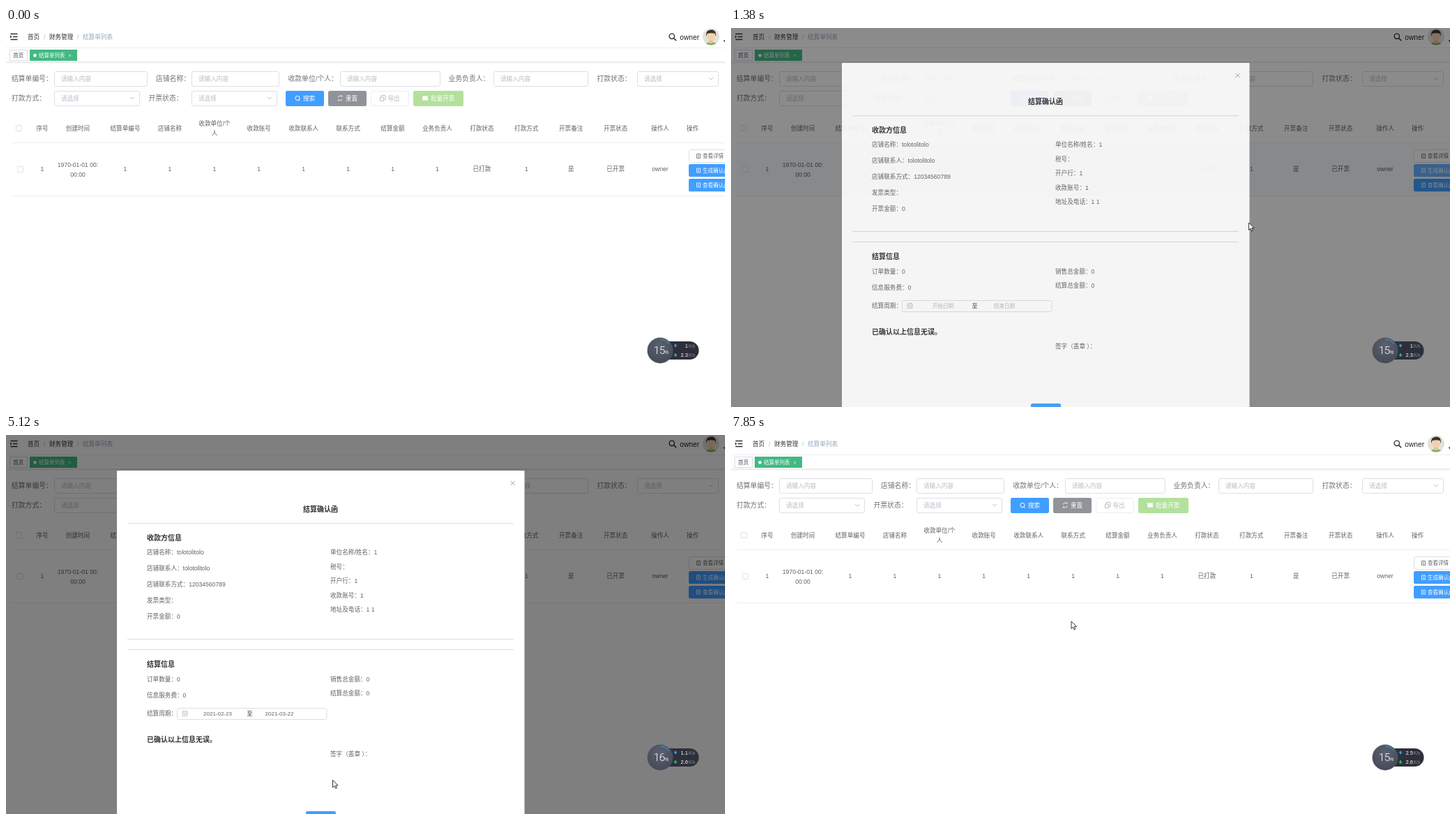
These frames come from a looping animation (1031x543 px, 8000 ms). An HTML page:

```html
<!DOCTYPE html>
<html lang="zh">
<head>
<meta charset="utf-8">
<title>结算单列表</title>
<style>
html, body { margin: 0; width: 100%; height: 100%; overflow: hidden; background: #fff; }
svg { display: block; width: 1031px; height: 543px; }
text { font-family: "Liberation Sans", "Noto Sans CJK SC", "Noto Sans CJK", sans-serif; white-space: pre; }
.thin { font-family: Roboto, "Open Sans", sans-serif; font-weight: 300; letter-spacing: -.4px; }
</style>
</head>
<body>
<svg id="stage" viewBox="0 0 1031 543"></svg>
<script>
const LOOP = 8000;
const BLUE = '#409eff', LIGHT = '#66b1ff', INK = '#606266', DARK = '#303133';
const PALE = '#b8bbc3', EDGE = '#dcdfe6';

// ---- drawing helpers (text is placed by its vertical centre) ----
const text = (x, y, s, size = 8.6, fill = INK, more = '') =>
  `<text x="${x}" y="${(y + size * 0.37).toFixed(2)}" font-size="${size}" fill="${fill}" ${more}>${s}</text>`;
const mid = (x, y, s, size, fill, more = '') => text(x, y, s, size, fill, 'text-anchor="middle" ' + more);
const bold = (x, y, s, more = '') => text(x, y, s, 10, DARK, 'font-weight="600" ' + more);
const rect = (x, y, w, h, fill, more = '') =>
  `<rect x="${x}" y="${y}" width="${w}" height="${h}" fill="${fill}" ${more}/>`;
const solid = (x, y, w, h, fill, more = '') => rect(x, y, w, h, fill, `rx="2.3" ${more}`);
const box = (x, y, w, h, fill, stroke, more = '', r = 2.3) =>
  rect(x + .5, y + .5, w - 1, h - 1, fill, `rx="${r}" stroke="${stroke}" ${more}`);
const path = (d, stroke, width = 1, more = '') =>
  `<path d="${d}" fill="none" stroke="${stroke}" stroke-width="${width}" ${more}/>`;
const circle = (x, y, r, fill, more = '') => `<circle cx="${x}" cy="${y}" r="${r}" fill="${fill}" ${more}/>`;
const line = (x1, y, x2, stroke) => path(`M${x1} ${y}H${x2}`, stroke);
const docIcon = (x, y, c) => path(`M${x - 2.5} ${y - 3}h5v6h-5zM${x - 1} ${y - 1}h2M${x - 1} ${y + 1}h2`, c, .8);

function input(x, y, w, hint) {
  return box(x, y, w, 22, '#fff', EDGE) + text(x + 10, y + 10.5, hint, 8.6, PALE);
}
function select(x, y, w) {
  return input(x, y, w, '请选择') + path(`M${x + w - 14} ${y + 9}l3 3 3-3`, PALE, .9);
}

function header() {
  return path('M6.5 8.5h10M10 12.5h6.5M6.5 16.5h10', DARK, 1.3) + `<path d="M6 10.5v4l2.6-2z" fill="${DARK}"/>`
    + text(31, 13, '首页', 8.6, DARK) + text(54, 13, '/', 8.6, PALE)
    + text(62, 13, '财务管理', 8.6, DARK) + text(102, 13, '/', 8.6, PALE)
    + text(110, 13, '结算单列表', 8.6, '#97a8be')
    + circle(954.8, 11.8, 3.7, 'none', `stroke="${DARK}" stroke-width="1.4"`) + path('M957.5 14.5l3.6 3.6', DARK, 1.6)
    + text(966.3, 13, 'owner', 10.2, '#222')
    + '<clipPath id="face"><circle cx="1011" cy="12.5" r="12"/></clipPath><g clip-path="url(#face)">'
    + rect(998, 0, 26, 26, '#e3e1da')
    + '<ellipse cx="1011" cy="26" rx="9" ry="6" fill="#84b254"/>'
    + rect(1008.5, 15, 5, 7, '#e8bf9a') + circle(1011, 12, 6, '#f3d1b0')
    + '<path d="M1004 12q-1-9 7-9.5q8 0 7 9.5l-1.5-4q-5-1.5-11 0z" fill="#40322a"/></g>'
    + '<path d="M1028.5 17.5h5l-2.5 3z" fill="#333"/>'
    + line(0, 28.5, 1031, '#eceef1')
    + box(5, 31, 26, 16, '#fff', '#d8dce5', '', 0) + mid(17.8, 39, '首页', 7.5, '#495060')
    + rect(34, 31, 68, 16, '#42b983') + circle(41.5, 39.3, 2.4, '#fff') + text(47, 39, '结算单列表', 7.5, '#fff')
    + path('M90 38l3 3m0-3l-3 3', '#fff', .7)
    + line(0, 49, 1031, '#d4d7dc') + line(0, 50, 1031, '#f1f2f4');
}

function filters() {
  const label = (x, y, s) => text(x, y, s, 9.8, '#6f7277');
  const hint = '请输入内容';
  return label(8, 72, '结算单编号：') + label(215, 72, '店铺名称：') + label(404.5, 72, '收款单位/个人：')
    + label(634.5, 72, '业务负责人：') + label(847.5, 72, '打款状态：')
    + label(8, 100.5, '打款方式：') + label(204.5, 100.5, '开票状态：')
    + input(69, 62, 134, hint) + input(266, 62, 126, hint) + input(479, 62, 144, hint) + input(699, 62, 136, hint)
    + select(905, 62, 117) + select(69, 90, 123) + select(266, 90, 123)
    + solid(401, 90, 55, 22, BLUE) + circle(418, 100.5, 3.1, 'none', 'stroke="#fff"')
    + path('M420 103l1.5 1.5', '#fff') + text(426, 100.5, '搜索', 8.6, '#fff')
    + solid(462, 90, 55, 22, '#909399')
    + path('M476.5 99.5a3 3 0 0 1 5.5-1v-2M482 101.5a3 3 0 0 1-5.5 1v2', '#fff', .9)
    + text(487, 100.5, '重置', 8.6, '#fff')
    + box(523, 90, 55, 22, '#fff', '#ebeef5') + path('M536.5 99h5v5.5h-5zM538.5 99v-2.5h5.5v6h-2.5', PALE, .9)
    + text(547.5, 100.5, '导出', 8.6, PALE)
    + solid(584, 90, 72, 22, '#b3e19d')
    + '<path d="M597 97.5h8v2q-1.5 1 0 2v2h-8v-2q1.5-1 0-2z" fill="#fff"/>'
    + text(609, 100.5, '批量开票', 8.6, '#fff');
}

function table() {
  const heads = ['结算单编号', '店铺名称', '', '收款账号', '收款联系人', '联系方式', '结算金额',
    '业务负责人', '打款状态', '打款方式', '开票备注', '开票状态', '操作人'];
  const cells = [1, 1, 1, 1, 1, 1, 1, 1, '已打款', 1, '是', '已开票', 'owner'];
  const at = i => 171 + i * 63.92;
  const op = (y, s, ink) => docIcon(993, y, ink) + text(999, y, s, 7.5, ink);
  return rect(8, 165, 1023, 75.5, '#f2f4f8', 'id="row" opacity="0"')
    + heads.map((s, i) => mid(at(i), 144, s, 8.6, INK)).join('')
    + mid(299, 137, '收款单位/个', 8.6, INK) + mid(299, 151, '人', 8.6, INK)
    + mid(52, 144, '序号', 8.6, INK) + mid(103, 144, '创建时间', 8.6, INK) + text(976, 144, '操作')
    + box(14, 139, 9, 9, '#fff', EDGE, '', 1) + box(16, 198, 9, 9, '#fff', EDGE, '', 1)
    + line(8, 164.5, 1031, '#ebeef5') + line(8, 240.5, 1031, '#ebeef5')
    + mid(52, 202, 1, 8.6, INK) + mid(103, 195.5, '1970-01-01 00:', 8.6, INK) + mid(103, 209.5, '00:00', 8.6, INK)
    + cells.map((s, i) => mid(at(i), 202, s, 8.6, INK)).join('')
    + box(979, 174, 70, 19, '#fff', EDGE) + op(183.5, '查看详情', INK)
    + solid(979, 195, 70, 18.3, BLUE, 'id="make"') + op(204, '生成确认函', '#fff')
    + solid(979, 216, 70, 18.3, BLUE) + op(225, '查看确认函', '#fff');
}

function dialog() {
  const left = ['店铺名称：tolotolitolo', '店铺联系人：tolotolitolo', '店铺联系方式：12034560789', '发票类型：', '开票金额：0'];
  const right = ['单位名称/姓名：1', '税号：', '开户行：1', '收款账号：1', '地址及电话：1 1'];
  const hint = (x, s) => mid(x, 399, s, 7.6, PALE);
  const date = (x, s) => mid(x, 399, s, 8, INK);
  return rect(159, 51, 584.5, 560, '#fff', 'rx="1"')
    + path('M723.5 66l6 6m0-6l-6 6', '#909399', .9)
    + bold(451, 106.5, '结算确认函', 'text-anchor="middle"')
    + [126.8, 292.5, 307.5].map(y => line(174, y, 728, '#dadbde')).join('')
    + bold(202, 147.5, '收款方信息')
    + left.map((s, i) => text(202, 168 + i * 23, s)).join('')
    + right.map((s, i) => text(465, 168 + i * 20.5, s)).join('')
    + bold(202, 328.7, '结算信息')
    + text(202, 350, '订单数量：0') + text(202, 372.5, '信息服务费：0')
    + text(465, 350, '销售总金额：0') + text(465, 370, '结算总金额：0')
    + text(202, 399, '结算周期：')
    + box(245, 391, 215.5, 17, '#fff', EDGE, 'id="range"')
    + path('M253 396h7v6.5h-7zM253 398.5h7M255 394.5v2M258 394.5v2M254.5 400.5h4', PALE, .8)
    + mid(349.5, 399, '至', 8, DARK)
    + `<g id="hints">${hint(304, '开始日期')}${hint(392, '结束日期')}</g>`
    + `<g id="dates">${date(303.5, '2021-02-23')}${date(392, '2021-03-22')}</g>`
    + rect(303.5, 394, .9, 10, '#222', 'id="caret"')
    + bold(202, 436, '已确认以上信息无误。')
    + text(465, 457, '签字（盖章 ）：')
    + solid(430, 539, 43, 19, BLUE, 'id="ok"') + mid(451.5, 548.5, '确定', 7.6, '#fff');
}

// ---- two-month calendar ----
const days = [];
function month(x0, title, prev, count, base) {
  let out = mid(x0 + 76, 198, title, 9.8, INK) + line(x0 - 13, 230.5, x0 + 165, '#ebeef5');
  [...'日一二三四五六'].forEach((s, i) => out += mid(x0 + i * 25.35, 217.5, s, 7.5, INK));
  for (let n = 0; n < 42; n++) {
    const x = x0 + n % 7 * 25.35, y = 241 + Math.floor(n / 7) * 22.05;
    if (n < 1 || n > count) {
      out += mid(x, y, n < 1 ? prev : n - count, 7.5, '#c0c4cc');
      continue;
    }
    const today = base === 0 && n === 23;
    out += `<g class="day">${rect(x - 12.7, y - 9, 25.4, 18, '#f2f6fc')}${circle(x, y, 7.5, BLUE)}`
      + mid(x, y, n, 7.5, INK, today ? 'font-weight="700"' : '') + '</g>';
    days.push({ x, y, n: base + n, today });
  }
  return out;
}
function picker() {
  const chevron = (x, dir) => path(`M${x - dir * 1.2} 195.5l${dir * 2.5} 2.5 ${-dir * 2.5} 2.5`, INK, .8);
  return '<path d="M264 372l4 4 4-4z" fill="#fff"/>'
    + box(245, 180, 397, 193, '#fff', '#e4e7ed', 'filter="url(#soft)"')
    + path('M443.5 181v191', '#e4e7ed')
    + chevron(261.7, -1) + chevron(264.7, -1) + chevron(277.2, -1)
    + chevron(609.3, 1) + chevron(622.7, 1) + chevron(625.7, 1)
    + month(268, '2021 年 2 月', 31, 28, 0) + month(466, '2021 年 3 月', 28, 31, 28);
}

function gauge() {
  const unit = y => text(979, y, 'K/s', 6.3, '#8d93a0');
  const num = (y, id) => text(978, y, '', 7.5, '#fff', `text-anchor="end" id="${id}"`);
  return rect(930, 449, 63.5, 26, '#2d303a', 'rx="13"')
    + circle(938, 462, 18.8, '#5a5f6c', 'opacity=".45"') + circle(938, 462, 18.2, 'url(#ball)')
    + path('M938 446.2a15.8 15.8 0 0 1 12.9 6.7', '#3c8fbe', 1.2)
    + text(928.7, 461.5, '', 15.2, '#fff', 'class="thin" id="load"') + text(944.3, 464.5, '%', 6.5, '#fff')
    + '<path d="M960 452.5l2.8 2.800h-1.8v2h-2v-2h-1.800z" fill="#3c9be6"/>'
    + '<path d="M960 471l2.8-2.800h-1.8v-2h-2v2h-1.800z" fill="#35b37a"/>'
    + num(455.5, 'up') + num(468.5, 'down') + unit(456) + unit(469);
}

const stage = document.getElementById('stage');
stage.innerHTML = `<defs>
  <radialGradient id="ball" cx=".5" cy=".35" r=".7"><stop offset="0" stop-color="#5d6270"/><stop offset="1" stop-color="#434856"/></radialGradient>
  <filter id="soft" x="-5%" y="-10%" width="110%" height="120%"><feDropShadow dx="0" dy="1.2" stdDeviation="3.5" flood-opacity=".12"/></filter></defs>`
  + rect(0, 0, 1031, 543, '#fff') + header() + filters() + table()
  + rect(0, 0, 1031, 543, '#000', 'id="shade"')
  + `<g id="dialog">${dialog()}</g><g id="picker">${picker()}</g>${gauge()}`
  + '<path id="arrow" d="M0 0v10.5l2.5-2.3 1.7 3.8 1.7-.8-1.7-3.6h3.4z" fill="#fff" stroke="#222" stroke-width=".9"/>'
  + path('M-2-5h1.5l.5.5.5-.5H2M0-4.5v9M-2 5h1.5l.5-.5.5.5H2', '#3d9a52', 1.1, 'id="beam"');

const el = {};
stage.querySelectorAll('[id]').forEach(n => el[n.id] = n);
stage.querySelectorAll('.day').forEach((g, i) => [days[i].band, days[i].dot, days[i].label] = g.children);

// ---- timing ----
const bursts = [[290, 440, 3], [610, 1380, 11], [1460, 2250, 11], [2320, 3090, 11], [3170, 3960, 11], [4060, 4810, 11],
  [4890, 5120, 4], [5350, 5510, 3], [5660, 5740, 2], [5900, 6690, 11], [6770, 7090, 5], [7240, 7470, 4], [7710, 7850, 3]];
const ticks = bursts.flatMap(([a, b, n]) => Array.from({ length: n }, (_, i) => a + i * (b - a) / (n - 1)));
const route = [[290, 985, 400], [440, 985, 317], [610, 985, 317], [1000, 999.5, 206.5], [1250, 999.5, 206.5],
  [1380, 742.5, 279], [1900, 450, 527], [2320, 450, 527], [2800, 291, 398], [3170, 300, 398], [3600, 314.5, 397.5],
  [4060, 314.5, 397.5], [4220, 318, 306], [4330, 318, 306], [4530, 490, 306], [4590, 490, 306], [4810, 424, 419],
  [5120, 468.5, 494.5], [5280, 468.5, 494.5], [5510, 470, 560], [5880, 470, 560], [6690, 508, 380], [7160, 508, 380], [7470, 488, 267]];
const loads = [[0, 15, '1', '2.3'], [1840, 16, '1.3', '2.9'], [2850, 16, '1.2', '2.5'], [3400, 16, '1.1', '3.1'],
  [4400, 16, '1.1', '2.6'], [5430, 16, '2.2', '4.8'], [6400, 16, '5.1', '14.4'], [7400, 16, '2.5', '2.6'], [7780, 15, '2.5', '2.6']];

const clamp = v => Math.max(0, Math.min(1, v));
function bezier(x1, y1, x2, y2) {
  const at = (a, b, u) => 3 * a * u * (1 - u) ** 2 + 3 * b * u * u * (1 - u) + u ** 3;
  return x => {
    let lo = 0, hi = 1;
    for (let i = 0; i < 20; i++) { const m = (lo + hi) / 2; at(x1, x2, m) < x ? lo = m : hi = m; }
    return at(y1, y2, lo);
  };
}
const ease = bezier(.25, .1, .25, 1), quint = bezier(.23, 1, .32, 1);
const fade = (t, start, end, f = ease, time = 300) => f(clamp((t - start) / time)) - f(clamp((t - end) / time));

function pointer(t) {
  const i = route.findIndex(p => p[0] > t);
  if (i <= 0) return (i ? route[route.length - 1] : route[0]).slice(1);
  const a = route[i - 1], b = route[i];
  let k = (t - a[0]) / (b[0] - a[0]);
  k = k * k * (3 - 2 * k);
  return [a[1] + (b[1] - a[1]) * k, a[2] + (b[2] - a[2]) * k];
}
const set = (node, map) => { for (const k in map) node.setAttribute(k, map[k]); };
const show = (node, on) => set(node, { visibility: on ? 'inherit' : 'hidden' });

function markDays(t, x, y) {
  const over = days.find(d => Math.abs(d.x - x) < 12.7 && Math.abs(d.y - y) < 11);
  const picking = t >= 4290, end = over && over.n > 23 ? over.n : t > 4500 ? 50 : 23;
  for (const d of days) {
    const edge = picking && (d.n === 23 || d.n === end);
    show(d.band, picking && d.n >= 23 && d.n <= end);
    show(d.dot, edge);
    set(d.label, { fill: edge ? '#fff' : d.today || d === over ? BLUE : INK });
  }
}

function render(t) {
  const [x, y] = pointer(t);
  const open = fade(t, 1206, 6750, ease, 270);
  set(el.shade, { opacity: open * .5 });
  set(el.dialog, { opacity: open, transform: `translate(0 ${-12.3 * (1 - open)})` });
  show(el.dialog, open > .001);
  set(el.row, { opacity: fade(t, 760, 1300, ease, 250) });
  set(el.make, { fill: t < 900 || t > 2900 ? BLUE : t > 1120 && t < 1300 ? '#3a8ee6' : LIGHT });
  set(el.ok, { fill: t >= 5660 ? LIGHT : BLUE });

  const focus = t >= 3560 && t < 4570, done = t >= 4570;
  set(el.range, { stroke: focus ? BLUE : EDGE });
  show(el.caret, focus && (t - 3560) % 1000 < 500);
  show(el.hints, !done);
  show(el.dates, done);

  const drop = fade(t, 3565, 4510, quint);
  set(el.picker, { opacity: fade(t, 3565, 4510), transform: `translate(0 ${372 * (1 - drop)}) scale(1 ${drop})` });
  show(el.picker, drop > .004);
  markDays(t, x, y);

  const load = loads.filter(r => r[0] <= t).pop();
  ['load', 'up', 'down'].forEach((k, i) => el[k].textContent = load[i + 1]);

  const typing = open > .9 && x > 246 && x < 460 && y > 391 && y < 408;
  const place = { transform: `translate(${x.toFixed(2)} ${y.toFixed(2)})` };
  set(el.arrow, place);
  set(el.beam, place);
  show(el.arrow, t >= 290 && !typing);
  show(el.beam, t >= 290 && typing);
}

const begin = performance.now();
function frame() {
  const now = (performance.now() - begin) % LOOP;
  // the picture advances in short bursts, so hold the latest tick
  render(ticks.filter(s => s <= now + 7).pop() || 0);
  requestAnimationFrame(frame);
}
frame();
</script>
</body>
</html>
```
